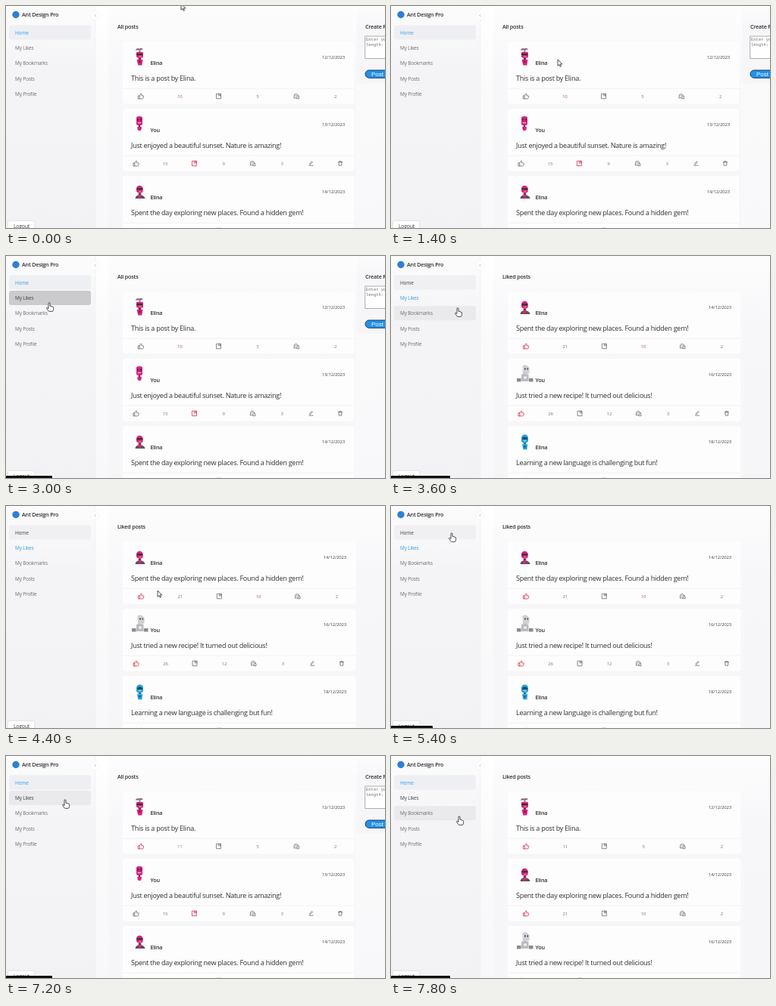
An HTML page that plays this animation: 500x294 px, repeating every 8000 ms.

```html
<!DOCTYPE html>
<html lang="en">
<head>
<meta charset="utf-8">
<title>Posts</title>
<style>
  html, body { margin: 0; width: 100%; height: 100%; overflow: hidden; background: #f7f7f9; }
  svg { display: block; width: 100vw; height: 100vh; }
  text { font: 6.5px "Open Sans", "Noto Sans", sans-serif; letter-spacing: -.028em; fill: #6f6f73; white-space: pre; }
  .bold { font-size: 7.2px; font-weight: 600; fill: #2e2e31; }
  .body { font-size: 9px; fill: #303033; }
  .date { font-size: 6px; fill: #444; text-anchor: end; }
  .count { font-size: 6px; fill: #77777a; text-anchor: middle; }
  .warm .ten { fill: #b0506c; }
  .hint { font: 5.5px "Liberation Mono", monospace; letter-spacing: 0; fill: #6c6c70; }
  .post { font: 8px "Liberation Sans", sans-serif; letter-spacing: 0; fill: #fff; }
  .icon { fill: none; stroke: currentColor; stroke-width: .75; stroke-linejoin: round; stroke-linecap: round; }
  .cursor { fill: #fff; stroke: #222; stroke-width: .8; stroke-linejoin: round; }
</style>
</head>
<body>
<svg id="stage" viewBox="0 0 500 294" preserveAspectRatio="none">
  <defs>
    <linearGradient id="page" x2="0" y2="1">
      <stop stop-color="#fff"/><stop offset=".35" stop-color="#fafafb"/><stop offset="1" stop-color="#f8f8fa"/>
    </linearGradient>
    <linearGradient id="side" x2="0" y2="1">
      <stop stop-color="#fcfcfd"/><stop offset=".3" stop-color="#f4f3f5"/><stop offset="1" stop-color="#f2f1f3"/>
    </linearGradient>
    <linearGradient id="column" x2="0" y2="1">
      <stop stop-color="#fdfdfe"/><stop offset=".3" stop-color="#f7f6f8"/><stop offset="1" stop-color="#f6f5f7"/>
    </linearGradient>
  </defs>
  <rect width="500" height="294" fill="url(#page)"/>
  <rect width="117.5" height="294" fill="url(#side)"/>
  <path d="M117.7 0V294" stroke="#ececee" stroke-width=".6"/>
  <circle cx="117.5" cy="12.5" r="5.5" fill="#fff" stroke="#f0f0f2" stroke-width=".6"/>
  <path d="M118.3 11l-1.5 1.5 1.5 1.5" class="icon" color="#aaa"/>
  <circle cx="13" cy="11.5" r="4.7" fill="#2f7fd6"/>
  <text class="bold" x="21" y="14">Ant Design Pro</text>
  <g id="menu"></g>
  <g id="pages"></g>
  <rect x="2.3" y="284.3" width="35.5" height="14" rx="2" fill="#fff" stroke="#d9d9dc" stroke-width=".7"/>
  <text x="10" y="294" style="font-size:6.8px;fill:#444">Logout</text>
  <rect id="status" x="0" y="291" height="6" rx="1" fill="#0c0c0e"/>
  <path id="arrow" class="cursor" d="M0 0V8.2L1.9 6.5 3.2 9.3 4.5 8.7 3.2 6H5.8Z"/>
  <path id="hand" class="cursor" d="M-1 .9Q-1-.2 0-.2T1 .9V4.3Q2.5 3.6 2.7 4.9Q4.1 4.2 4.3 5.5Q5.6 5.1 5.6 6.5V8.3Q5.6 10 4.5 11.3H-.4L-3.4 7.4Q-3.6 5.9-2.3 6.3L-1 7.6Z"/>
</svg>
<script>
const $ = id => document.getElementById(id);
const RED = '#d8213f', BLUE = '#3a9de6', GREY = '#626266', PINK = '#d9227d', PLUM = '#8b1a52', DARK = '#3a3038';

const icons = {
  like: 'M-3.4-.6h1.5v4h-1.5zM-1.9-.6L-.1-3.4q1.2-.3 1 1.2l-.3 1.5h2.3q.9.2.7 1.1l-.8 2.6q-.2.4-.8.4h-3.9',
  save: 'M-2.8-3.2h5.6v6.4h-5.6zM.1-3.2v2.8l1-.7 1 .7v-2.8',
  talk: 'M-3.2 2.2V-.5a2.6 2.6 0 1 1 2.6 2.7zM2.2-1.1a2.2 2.2 0 0 1 1.1 2v2.3H1a2.2 2.2 0 0 1-1.5-.7M-1.6-.5h2',
  edit: 'M-1.7 1l-.1-1 2.8-2.9 1 1-2.8 2.9zM-2.6 2.7h5.2',
  trash: 'M-2.6-1.8h5.2M-1.1-1.8v-1h2.2v1M-2-1.8l.2 4.5h3.6l.2-4.5'
};

const shape = (d, fill) => `<path d="${d}" fill="${fill}"/>`;

// Robots are drawn around x = 0, from y = 0 down to 24.
const robots = {
  fan: shape('M-5.5 3.5Q-3 0 0 1.5Q3-.5 5 2.5L1.5 3.2 1 6H0L-.2 3.4z', '#8a6a78') +
    shape('M-4 7Q-4 5.5 0 5.5T5 7v4.5Q5 14 1 14t-5-2z', PINK) + shape('M-4 8h8v2.2h-8z', DARK) +
    shape('M-1 11.3h4v1h-4z', '#f0a34a') + shape('M-1.2 14h3.4v2h-3.4z', PLUM) +
    shape('M-3.5 16h8l-1.2 7.5h-5z', PINK) + shape('M-1 17.5h2.6v2.6h-2.6z', PLUM),
  tall: shape('M-4 4Q-4 2 0 2T4 4v8q0 2-2 2h-4q-2 0-2-2z', PINK) +
    shape('M-2.8 5.5h2v2.2h-2zM1 5.5h2v2.2H1z', DARK) + shape('M-2.3 10h4.6v1.2h-4.6z', '#f7b9d4') +
    shape('M-1.2 14h2.4v2h-2.4z', PLUM) + shape('M-2.6 16h5.4v3q-1 2.2-2.7 2.2t-2.7-2.2z', PINK),
  round: shape('M-4 9a4.3 4.3 0 0 1 8.6 0v3q0 2.5-4 2.5T-4 12z', PINK) +
    shape('M-3.5 8.2h8v2.2h-8z', DARK) + shape('M-.6 12h3v1h-3z', '#f0a34a') +
    shape('M-1.2 14.5h3.4v3h-3.4z', PLUM) + shape('M-5.5 22q.5-4 4-4.5h4q4 .5 5 4.5z', '#5a5056') +
    shape('M-1.8 17.5h4.4l-.8 4h-2.8z', PINK),
  wide: shape('M-2.5 2Q0-1 4 1.5L6.5 4V11Q5 13-2 12z', '#cfd0d3') +
    shape('M0 4.5h1.8v2H0zM3.5 4.5h1.6v2H3.5z', '#44464a') + shape('M-4 13Q0 11 5.5 13v9H-4z', '#b9bbbf') +
    shape('M-10 18h5.5v4.5h-5.5zM6 18h5.5v4.5H6z', '#8a8c91') + shape('M-1 15.5h4v3h-4z', '#eeeef0'),
  blue: shape('M-4 8a4.5 4.5 0 0 1 9 0v3.5q0 3-4.5 3T-4 11.5z', '#22a3d9') +
    shape('M-2.8 8Q.5 5 4 8v1.8h-6.8z', '#233d4d') + shape('M-1.2 11.3h3.6v1h-3.6z', '#bfe6f5') +
    shape('M-1.2 14.3h3.4v2h-3.4z', '#14668a') + shape('M-3 16.3h7.2l-.8 7h-5z', '#22a3d9') +
    shape('M-.8 18h2.6v2.6h-2.6z', '#14668a')
};

const posts = {
  first: { name: 'Elina', day: 12, text: 'This is a post by Elina.', counts: [10, 5, 2], robot: 'fan' },
  sunset: { name: 'You', day: 13, text: 'Just enjoyed a beautiful sunset. Nature is amazing!', counts: [15, 9, 3], robot: 'tall', saved: true },
  places: { name: 'Elina', day: 14, text: 'Spent the day exploring new places. Found a hidden gem!', counts: [21, 10, 2], robot: 'round' },
  recipe: { name: 'You', day: 16, text: 'Just tried a new recipe! It turned out delicious!', counts: [26, 12, 3], robot: 'wide' },
  language: { name: 'Elina', day: 18, text: 'Learning a new language is challenging but fun!', counts: [14, 6, 2], robot: 'blue' }
};
const firstLiked = { ...posts.first, counts: [11, 5, 2] };

const icon = (name, x, color) =>
  `<path class="icon ${name}" d="${icons[name]}" transform="translate(${x} 72.5)" color="${color}"/>`;
const count = (n, x, kind) =>
  `<text class="count ${kind} ${n === 10 ? 'ten' : ''}" x="${x}" y="74.8">${n}</text>`;

function card(post, row, liked) {
  const own = post.name === 'You', width = liked ? 309.8 : 307.8;
  const step = width / (own ? 8 : 6), at = i => 152.4 + (i + .5) * step;
  const colors = [liked ? RED : GREY, post.saved ? RED : GREY, GREY];
  const actions = ['like', 'save', 'talk'].map((name, i) =>
    icon(name, at(2 * i), colors[i]) + count(post.counts[i], at(2 * i + 1), name + 's')).join('');
  return `<g transform="translate(0 ${47 + 89 * row})">
    <rect x="154" width="${width - 2.3}" height="82.8" rx="4" fill="#fdfdfe"/>
    <g transform="translate(176 8)">${robots[post.robot]}</g>
    <text class="bold" x="190.5" y="30.8">${post.name}</text>
    <text class="date" x="${liked ? 449 : 447}" y="23">${post.day}/12/2023</text>
    <text class="body" x="165" y="51.8">${post.text}</text>
    <path d="M154 62.3h${width - 2.3}" stroke="#efeff1" stroke-width=".7"/>
    ${actions}${own ? icon('edit', at(6), GREY) + icon('trash', at(7), GREY) : ''}
  </g>`;
}

const createPanel = `<rect x="462.5" y="-5" width="44" height="108" rx="4" fill="url(#column)"/>
  <text class="bold" x="474" y="29.7">Create Post</text>
  <rect x="473.8" y="40" width="60" height="29.5" fill="#fff" stroke="#8b8b90" stroke-width=".7"/>
  <text class="hint" x="475" y="46.3">Enter your</text><text class="hint" x="475" y="53.3">length: 280</text>
  <rect x="474" y="85" width="40" height="10.3" rx="5.1" fill="#2290ee" stroke="#16324f" stroke-width=".9"/>
  <text class="post" x="482" y="93">Post</text>`;

const page = (id, title, list, liked) => `<g id="${id}">
  <rect x="135.5" y="0" width="${liked ? 365 : 326}" height="294" fill="url(#column)"/>
  <text class="bold" x="147" y="29.7">${title}</text>
  ${list.map((post, row) => card(post, row, liked)).join('')}${liked ? '' : createPanel}</g>`;

$('pages').innerHTML =
  page('all', 'All posts', [posts.first, posts.sunset, posts.places], false) +
  page('liked', 'Liked posts', [posts.places, posts.recipe, posts.language], true) +
  page('relinked', 'Liked posts', [firstLiked, posts.places, posts.recipe], true);

$('menu').innerHTML = ['Home', 'My Likes', 'My Bookmarks', 'My Posts', 'My Profile'].map((label, i) =>
  `<rect x="4" y="${25.5 + 20.4 * i}" width="108" height="19" rx="3" fill="none"/>
   <text x="12" y="${37.5 + 20.4 * i}">${label}</text>`).join('');
const rows = [...$('menu').querySelectorAll('rect')], labels = [...$('menu').querySelectorAll('text')];
const firstThumb = document.querySelector('#all .like'), firstCount = document.querySelector('#all .likes');

// Pointer stops: time, x, y
const path = [
  [0, 231, -3], [1400, 220, 71], [1800, 212, 82], [2800, 62, 60], [3000, 57, 62], [3200, 57, 60],
  [3600, 88, 69], [4400, 200, 112], [5000, 118, 62], [5400, 80, 36], [5600, 78, 36], [6200, 181, 120],
  [6600, 180, 119], [7200, 78, 58], [7400, 76, 57], [7800, 90, 80]
];

function pointer(t) {
  const i = path.findLastIndex(p => p[0] <= t), a = path[i], b = path[i + 1] || a;
  const k = b === a ? 0 : (t - a[0]) / (b[0] - a[0]), e = k * k * (3 - 2 * k);
  return [a[1] + (b[1] - a[1]) * e, a[2] + (b[2] - a[2]) * e];
}

const show = (id, on) => $(id).style.display = on ? '' : 'none';

function draw() {
  const t = Math.floor(performance.now() % 8000 / 200) * 200;
  const within = (from, to) => t >= from && t < to;
  const onLiked = within(3200, 5800);
  show('all', !onLiked && t < 7400);
  show('liked', onLiked);
  show('relinked', t >= 7400);
  $('pages').setAttribute('class', t < 5800 ? 'warm' : '');

  const [x, y] = pointer(t);
  const row = x < 112 && y > 25 && y < 127 ? Math.floor((y - 25) / 20.4) : -1;
  const pressed = t === 3000 || t === 7400;
  rows.forEach((r, i) => r.setAttribute('fill',
    i === row && i > 0 ? (pressed ? '#cbcbcd' : '#eae9eb') : i > 0 ? 'none' : onLiked ? '#f0eff1' : '#eeeff3'));
  labels[0].style.fill = onLiked ? '#444' : BLUE;
  labels[1].style.fill = onLiked ? BLUE : row === 1 || t >= 7200 ? '#444' : '';

  show('status', row >= 0);
  $('status').setAttribute('width', [55, 61, 78, 61, 64][row] || 0);

  const clicked = t >= 6400;
  firstThumb.setAttribute('color', clicked ? RED : t >= 6200 ? BLUE : GREY);
  firstCount.textContent = clicked ? 11 : 10;

  const hand = row >= 0 || within(6200, 6800);
  show('hand', hand);
  show('arrow', !hand);
  $(hand ? 'hand' : 'arrow').setAttribute('transform', `translate(${x} ${y})`);
  requestAnimationFrame(draw);
}
draw();
</script>
</body>
</html>
```
